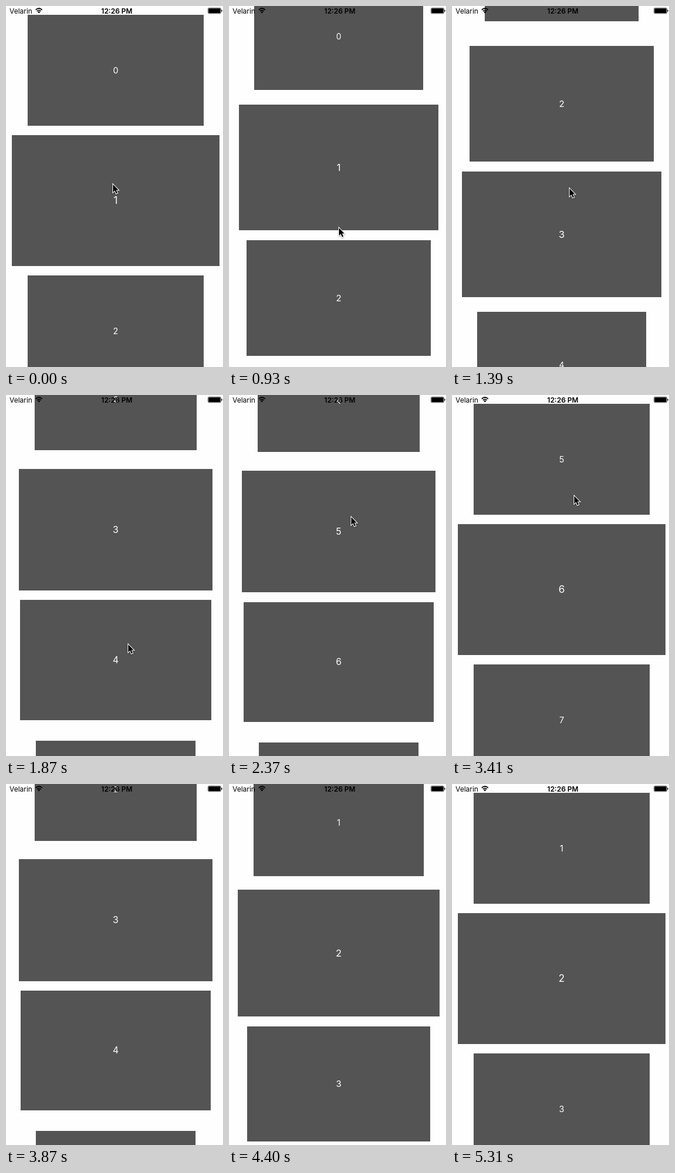
An HTML page for the animation above (6.09 s loop, 371x615 px).

```html
<!DOCTYPE html>
<html lang="en">
<head>
<meta charset="utf-8">
<title>Scaling cards</title>
<style>
  html, body { margin: 0; width: 100%; height: 100%; overflow: hidden; background: #fefefe; }
  #stage { position: relative; width: 371px; height: 615px; overflow: hidden; font-family: Inter, Roboto, sans-serif; }
  .card { position: absolute; background: #545454; color: #fff; text-align: center; }
  svg { position: absolute; left: 0; top: 0; overflow: visible; }
  #cursor { filter: drop-shadow(0 1.5px 1px rgba(0, 0, 0, .35)); }
</style>
</head>
<body>
<div id="stage">
  <svg id="bar" width="371" height="20" font-size="12">
    <text x="6" y="12.5">Velarin</text>
    <text x="189.5" y="12.5" font-weight="600" text-anchor="middle">12:26 PM</text>
    <g fill="none" stroke="#000" stroke-width="1.7">
      <path d="M50.8 6.6Q56.3 1.4 61.8 6.6"/>
      <path d="M52.9 8.9Q56.3 5.7 59.7 8.9"/>
    </g>
    <path d="M54.2 10.2Q56.3 8.5 58.4 10.2L56.3 12.5Z"/>
    <rect x="345.4" y="3.4" width="22" height="9.4" rx="1.8" fill="none" stroke="#000" stroke-width=".7"/>
    <rect x="346.3" y="4.3" width="20.2" height="7.6" rx="1"/>
    <path d="M368.3 6.3Q369.8 6.7 369.8 8.1Q369.8 9.5 368.3 9.9Z"/>
  </svg>
  <svg id="cursor" width="14" height="20">
    <path d="M1 2V15.2L4.1 12.3L6.4 17.6L8.6 16.7L6.3 11.5H10.3Z"
      stroke="#fff" stroke-width="2" paint-order="stroke"/>
  </svg>
</div>
<script>
const LOOP = 6090, CARDS = 9;
const MID_X = 187.5, MID_Y = 331.6, PITCH = 222.4, W = 355, H = 222.5, SHRINK = .15;

const linear = u => u;
const smooth = u => u * u * (3 - 2 * u);
const power = n => u => u ** n;
// Exponential slow-down; k is the duration in time constants.
const coast = k => u => (1 - Math.exp(-k * u)) / (1 - Math.exp(-k));

// [time, values..., easing from the previous step]
const SCROLL = [
  [0, 0, linear],
  [730, 0, linear],
  [1010, 120, power(2.27)],
  [1980, 568.1, coast(1.7086)],
  [2200, 783.3, power(2)],
  [3210, 5 * PITCH, coast(5.77)],
  [3410, 5 * PITCH, linear],
  [3670, 903.4, power(3)],
  [5190, PITCH, coast(5.63)]
];
const POINTER = [
  [0, 182, 302, linear],
  [30, 182, 302, linear],
  [550, 184.5, 450, smooth],
  [730, 184.5, 450, linear],
  [930, 187, 377, power(2)],
  [1010, 190, 305, linear],
  [1150, 195, 230, coast(2)],
  [1700, 208, 423, smooth],
  [1980, 208, 423, linear],
  [2200, 208, 225, power(2)],
  [2370, 208, 206, coast(3)],
  [3200, 208, 162, smooth],
  [3330, 208, 162, linear],
  [3410, 208, 170, linear],
  [3670, 225, 400, power(3)],
  [3790, 250, 640, linear],
  [5230, 313, 640, linear],
  [5250, 313, 611, linear],
  [5290, 320, 610, linear],
  [5310, 321, 640, linear]
];

function sample(steps, t) {
  const i = steps.findIndex(s => s[0] > t);
  if (i < 0) return steps[steps.length - 1].slice(1, -1);
  const a = steps[i - 1], b = steps[i];
  const u = b[b.length - 1]((t - a[0]) / (b[0] - a[0]));
  return a.slice(1, -1).map((v, k) => v + (b[k + 1] - v) * u);
}

const stage = document.getElementById('stage');
const bar = document.getElementById('bar');
const cursor = document.getElementById('cursor');
const cards = Array.from({ length: CARDS }, (_, i) => {
  const card = document.createElement('div');
  card.className = 'card';
  card.textContent = i;
  stage.insertBefore(card, bar);
  return card;
});

function place(card, i, scroll) {
  const y = MID_Y + (i - 1) * PITCH - scroll;
  const scale = Math.max(0, 1 - SHRINK * Math.abs(y - MID_Y) / PITCH);
  const left = Math.round(MID_X - W * scale / 2), right = Math.round(MID_X + W * scale / 2);
  const top = Math.round(y - H * scale / 2), bottom = Math.round(y + H * scale / 2);
  Object.assign(card.style, {
    left: left + 'px',
    top: top + 'px',
    width: right - left + 'px',
    height: bottom - top + 'px',
    lineHeight: bottom - top + 'px',
    fontSize: 17 * scale + 'px',
    display: bottom > 0 && top < 615 ? 'block' : 'none'
  });
}

function draw(t) {
  const [scroll] = sample(SCROLL, t);
  cards.forEach((card, i) => place(card, i, scroll));
  const [x, y] = sample(POINTER, t);
  cursor.style.transform = `translate(${Math.round(x)}px, ${Math.round(y)}px)`;
}

const start = performance.now();
function tick() {
  draw((performance.now() - start) % LOOP);
  requestAnimationFrame(tick);
}
tick();
</script>
</body>
</html>
```
